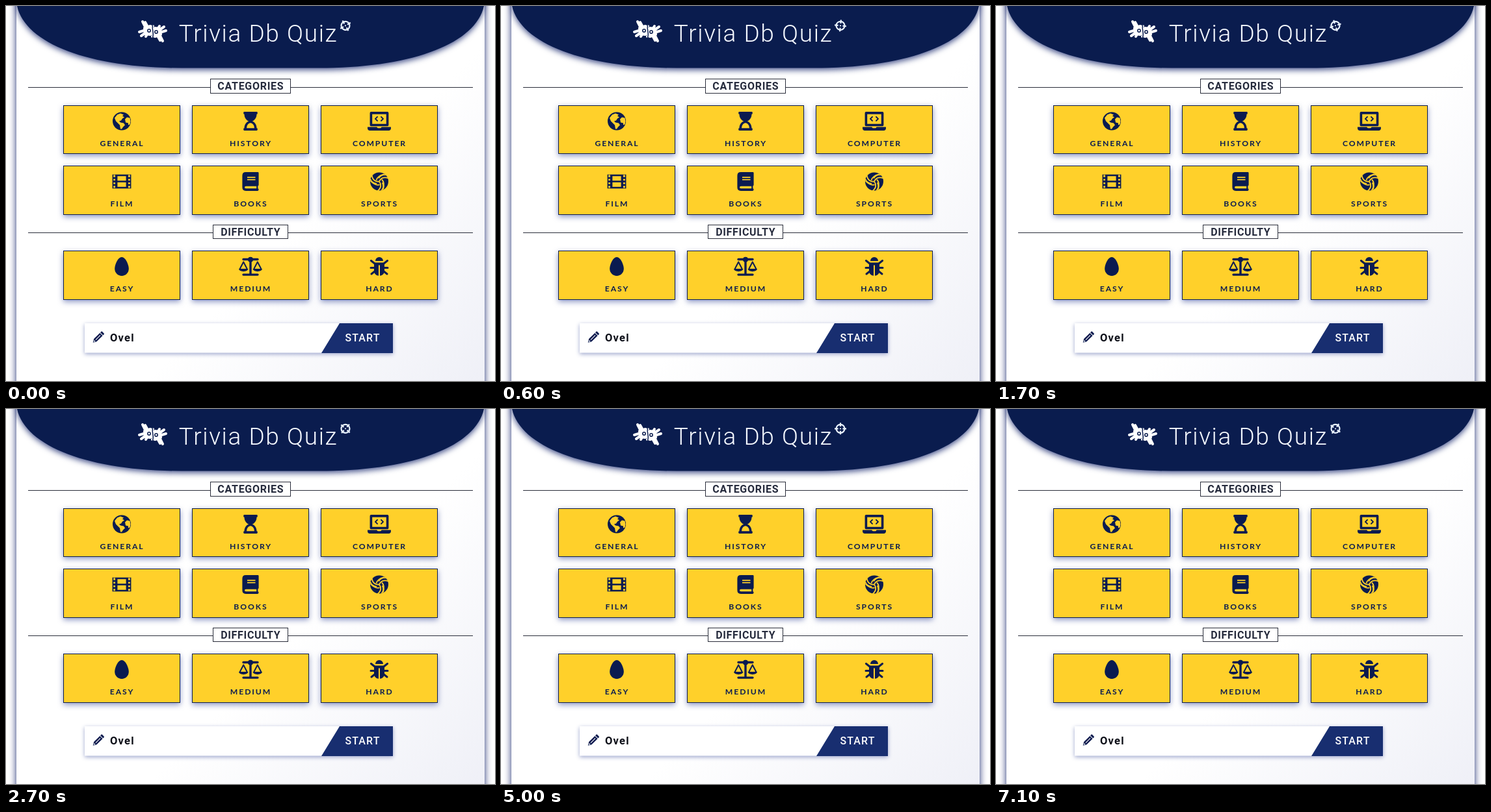
Write an HTML page that moves like this. It is 752 by 578 pixels and loops after 7200 ms.

```html
<!DOCTYPE html>
<html lang="en">
<head>
<meta charset="utf-8">
<title>Trivia Db Quiz</title>
<style>
  html, body { margin: 0; width: 100%; height: 100%; overflow: hidden; background: #fff; }
  svg { display: block; width: 752px; height: 578px; --navy: #0a1b50; --gold: #ffd02a; }
  text { font-family: Roboto, sans-serif; text-anchor: middle; }
  .panel { fill: url(#paper); filter: drop-shadow(0 0 6px #1c2a70); }
  .header { fill: #0a1c4e; filter: drop-shadow(0 3px 5px #14246ccc); }
  .title { font-size: 37px; font-weight: 300; letter-spacing: 1.6px; fill: #f4f8ff; }
  .hand { fill: #fff; stroke: #fff; stroke-width: 4; stroke-linecap: round; stroke-linejoin: round; }
  .section path, .section rect { fill: #fff; stroke: #2a2d3a; }
  .section text { font-size: 16px; font-weight: 700; letter-spacing: .7px; fill: #262b3d; }
  .card > rect { fill: var(--gold); stroke: var(--navy); filter: drop-shadow(0 3px 4px #1e328c80); }
  .card text { font: 700 12.2px Lato, sans-serif; letter-spacing: 1.9px; fill: var(--navy); }
  .dark { fill: var(--navy); }
  .gold { fill: var(--gold); }
  .line { fill: none; stroke: var(--navy); stroke-linecap: round; stroke-linejoin: round; }
  .cut { fill: none; stroke: var(--gold); stroke-width: 1.8; }
  .field { fill: #fff; filter: drop-shadow(0 2px 3px #1e328c70); }
  .name { font-size: 16.5px; font-weight: 700; letter-spacing: 1.2px; text-anchor: start; fill: #0d0f18; }
  .start { font-size: 16px; font-weight: 500; letter-spacing: 1.1px; fill: #fff; }
</style>
</head>
<body>
<svg id="stage" viewBox="0 0 752 578">
  <defs>
    <linearGradient id="paper" gradientUnits="userSpaceOnUse" x1="160" y1="0" x2="736" y2="578">
      <stop offset=".55" stop-color="#fff"/>
      <stop offset="1" stop-color="#eff0f7"/>
    </linearGradient>
    <g id="hand">
      <path d="M213 34L222 31L227 36L222 44L214 43Z"/>
      <path d="M216 36L210 24M219 34L214 25M215 37L205 40M215 41L208 46M218 42L215 47M221 33L226 31" fill="none"/>
    </g>
  </defs>

  <rect class="panel" x="16" y="-40" width="720" height="660"/>
  <path class="header" d="M17 -20V0C30 58 128 95.500 270 95.500H482C624 95.500 722 58 735 0V-20Z"/>
  <g class="hand">
    <use href="#hand"/>
    <use href="#hand" transform="rotate(180 225.500 39)"/>
  </g>
  <g fill="none" stroke="#0a1c4e" stroke-width="1.500">
    <path d="M226 28C223 36 229 42 225 50"/>
    <circle cx="220" cy="38" r="2.200"/>
    <circle cx="231" cy="40" r="2.200"/>
  </g>
  <text class="title" x="388" y="55">Trivia Db Quiz</text>
  <g id="crosshair" fill="none" stroke="#eaf3ff" stroke-width="2.200">
    <circle r="6.500"/>
    <path d="M0 -9V-3.400M0 9V3.400M-9 0H-3.400M9 0H3.400"/>
    <circle r="1.100" fill="#eaf3ff" stroke="none"/>
  </g>

  <g class="section">
    <path d="M34 125.500H718M34 349.500H718"/>
    <rect x="314.500" y="112.500" width="123" height="22"/>
    <rect x="318.500" y="337.500" width="115" height="21"/>
    <text x="376.300" y="129">CATEGORIES</text>
    <text x="376.300" y="354">DIFFICULTY</text>
  </g>

  <g id="cards"></g>

  <rect class="field" x="121" y="489" width="474" height="45.500"/>
  <path fill="#182e70" d="M485 535L513 489H595V535Z"/>
  <g transform="translate(141.500 511) rotate(45)">
    <path class="dark" d="M-3 -7H3V6L0 11L-3 6ZM-3 -8V-10Q-3 -11 -2 -11H2Q3 -11 3 -10V-8Z"/>
    <path d="M0 -5V5" stroke="#fff"/>
    <path d="M-1.500 7H1.500L0 9.500Z" fill="#fff"/>
  </g>
  <text class="name" x="160" y="517">Ovel</text>
  <text class="start" x="548.500" y="517">START</text>
</svg>

<script>
const SPIN_MS = 6000, LOOP_MS = 7200, START_ANGLE = 60;

const dark = d => `<path class="dark" d="${d}"/>`;
const gold = d => `<path class="gold" d="${d}"/>`;
const line = (d, width) => `<path class="line" stroke-width="${width}" d="${d}"/>`;
const cut = d => `<path class="cut" d="${d}"/>`;
const ball = '<circle class="dark" r="14"/>';
const mirror = art => art + `<g transform="scale(-1 1)">${art}</g>`;
const holes = [-8.2, -2.8, 2.6, 8].map(y => `M-12.800 ${y - 1.2}h2.800v2.600h-2.800z`).join('');

// Each icon is centred on its own origin.
const icons = {
  GENERAL: ball +
    gold('M-11 -5L-7 -10L-2 -12L3 -10L1 -8L4 -6L1 -4L-1 -1L-4 0L-2 2L3 3L5 6L2 9L0 12L-2 12L-3 6L-6 3L-9 0Z') +
    gold('M12.500 -5L8 -6L5 -3L6 2L10 3L10 6L12.500 5L13.500 0Z'),
  HISTORY: dark('M-9.500 -14.400H9.500Q10.800 -14.400 10.800 -13V-12Q10.800 -10.800 9.500 -10.800C9.500 -5.700 6.600 -1.400 2.700 0C6.600 1.400 9.500 5.700 9.500 10.800Q10.800 10.800 10.800 12V13Q10.800 14.400 9.500 14.400H-9.500Q-10.800 14.400 -10.800 13V12Q-10.800 10.800 -9.500 10.800C-9.500 5.700 -6.600 1.400 -2.700 0C-6.600 -1.400 -9.500 -5.700 -9.500 -10.800Q-10.800 -10.800 -10.800 -12V-13Q-10.800 -14.400 -9.500 -14.400Z') +
    gold('M-5.900 10.800C-5.900 6.400 -3.300 2.700 0 2.700S5.900 6.400 5.900 10.800Z'),
  COMPUTER: line('M-12.600 6V-12.600H12.600V6Z', 3.6) +
    line('M-3 -6.600L-6 -3.600L-3 -.6M3 -6.600L6 -3.600L3 -.6', 2) +
    dark('M-18 9H-3.600Q-3.400 10.800 -1.800 10.800H1.600Q3.300 10.800 3.500 9H18V10.800Q18 14.400 14.400 14.400H-14.400Q-18 14.400 -18 10.800Z'),
  FILM: dark('M-14.400 -10.800H14.400V10.800H-14.400Z') + mirror(gold(holes)) +
    gold('M-6.600 -8.200H6.600V-1.200H-6.600ZM-6.600 1.200H6.600V8.200H-6.600Z') +
    mirror(gold('M-12.800 -10.800H-10V-10H-12.800ZM-12.800 10.800H-10V10.200H-12.800Z')),
  BOOKS: dark('M-7.200 -14.400H11.200Q12.600 -14.400 12.600 -13V5Q12.600 6.500 11.400 7V10.800Q12.600 11 12.600 12.600Q12.600 14.400 11 14.400H-7.200Q-12.600 14.400 -12.600 9V-9Q-12.600 -14.400 -7.200 -14.400Z') +
    gold('M-7.200 7.200H9.200V10.800H-7.200A1.800 1.800 0 0 1 -7.200 7.200Z') +
    cut('M-5 -6.400H7.500M-5 -2.800H7.500'),
  SPORTS: ball + [0, 120, 240].map(a => `<g transform="rotate(${a})">` +
    cut('M0 0C2 -5 7 -8 14 -5M-1 -5C2 -9 6 -11 10 -10M4 -3C7 0 8 5 6 12') + '</g>').join(''),
  EASY: dark('M0 -14.400C6 -14.400 10.800 -2.400 10.800 3.600A10.800 10.800 0 0 1 -10.800 3.600C-10.800 -2.400 -6 -14.400 0 -14.400Z'),
  MEDIUM: line('M-11 -11H11M0 -10V12M-11 12.600H11', 3.4) + '<circle class="dark" cy="-10.800" r="4"/>' +
    mirror(line('M-16 3L-10.800 -7L-5.600 3', 2) + dark('M-18 3.500H-3.600C-4 9 -17.600 9 -18 3.500Z')),
  HARD: dark('M-6 -8.500A6 6 0 0 1 6 -8.500ZM-8 -6H8V6Q8 13.500 1 14.200V-2H-1V14.200Q-8 13.500 -8 6Z') +
    mirror(line('M-12.600 -9L-7 -4.500M-13 2H-7M-12 11.500L-7 7.500', 3)),
};

document.getElementById('cards').innerHTML = Object.entries(icons).map(([label, art], i) => {
  const x = 88 + 198 * (i % 3), y = [153, 246, 377][Math.floor(i / 3)];
  return `<g class="card" transform="translate(${x} ${y})">
    <rect x=".5" y=".5" width="179" height="${y === 153 ? 74 : 75}"/>
    <g transform="translate(90 24.500)">${art}</g>
    <text x="90.500" y="62.500">${label}</text></g>`;
}).join('');

const crosshair = document.getElementById('crosshair');
function draw() {
  const t = performance.now() % LOOP_MS;
  const step = Math.floor(t / 100) * 100;
  const angle = START_ANGLE + step / SPIN_MS * 360;
  crosshair.setAttribute('transform', `translate(522 30.300) rotate(${angle})`);
  requestAnimationFrame(draw);
}
draw();
</script>
</body>
</html>
```
